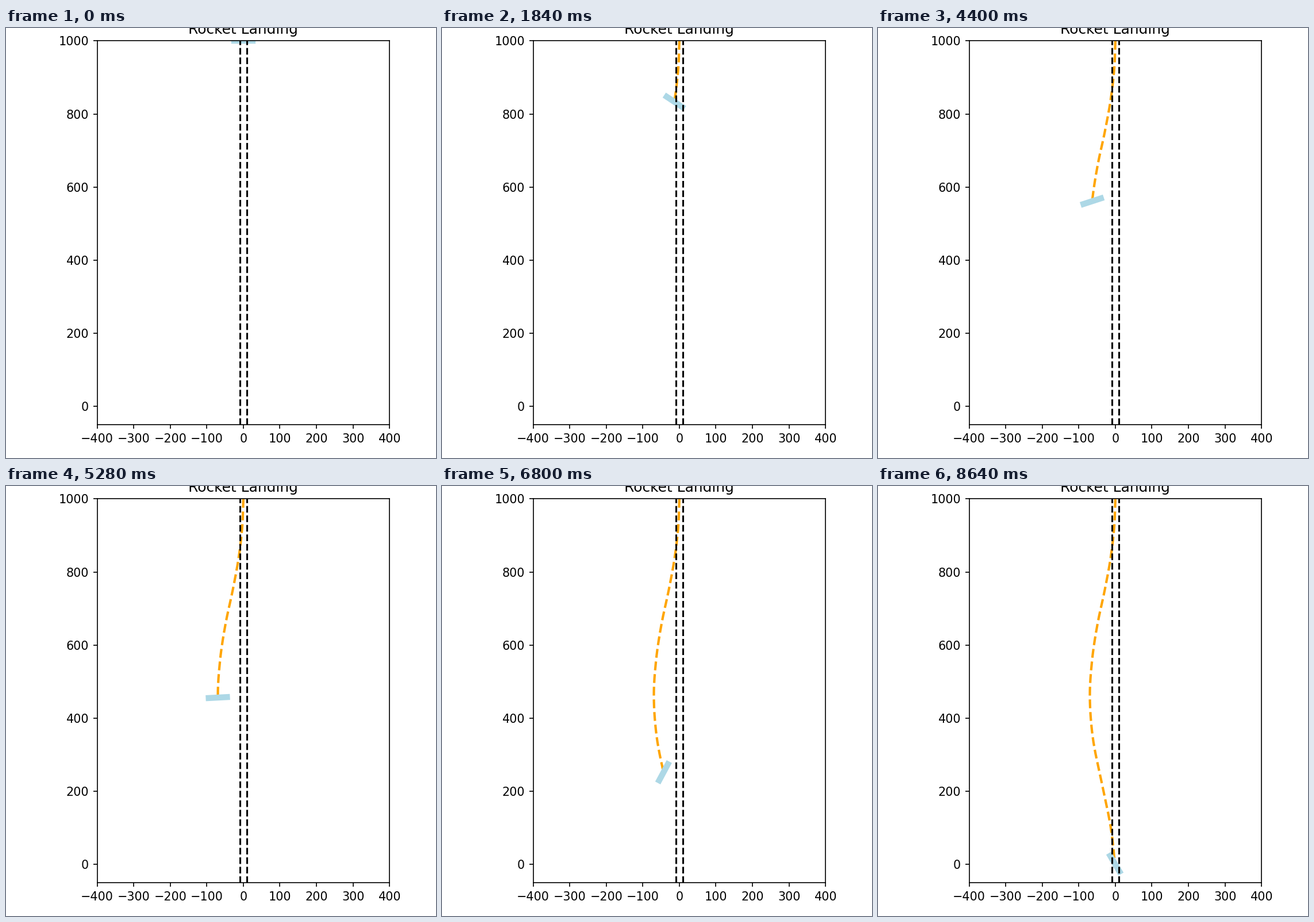
Recreate the animation shown at these times as a matplotlib script. Size 748 px wide and 748 px high, loop 8680 ms.

```python
import matplotlib.pyplot as plt
import numpy as np
from matplotlib.animation import FuncAnimation

SIZE = 748
FRAMES = 217
STEP = 40          # ms per frame
KNOT = 0.88        # seconds between flight knots
LENGTH = 50        # rocket length in metres

# Flight knots: position in metres and direction of the tail in degrees
KNOT_X = [0, -3, -12.5, -29, -48.8, -63.4, -69.8, -60.9, -36.2, -12.1, 0.8]
KNOT_Y = [1000, 925, 841.3, 750.6, 657.8, 561.4, 456.4, 341.1, 218.5, 97.8, -19.3]
KNOT_TAIL = [0, -8, -30.5, -72, -124, -162, -177, -158.5, -103, -61, -60]

# Engine bursts: start, end (s), direction (deg), flame length (m)
BURSTS = [
    (3.04, 3.20, 31, 22),
    (3.44, 3.52, 195, 22),
    (6.96, 7.08, -135, 48),
]


def spline(knots, t):
    """Cubic Hermite curve through evenly spaced knots."""
    p = np.asarray(knots, float)
    m = np.gradient(p)
    k = np.minimum((t / KNOT).astype(int), len(p) - 2)
    s = t / KNOT - k
    return ((1 + 2 * s) * (1 - s) ** 2 * p[k] + s * (1 - s) ** 2 * m[k]
            + s ** 2 * (3 - 2 * s) * p[k + 1] + s ** 2 * (s - 1) * m[k + 1])


def ray(angle, length):
    return length * np.cos(angle), length * np.sin(angle)


time = np.arange(FRAMES) * STEP / 1000
xs = spline(KNOT_X, time)
ys = spline(KNOT_Y, time)
tails = np.radians(spline(KNOT_TAIL, time))

plt.rcParams["font.family"] = "DejaVu Sans"
fig = plt.figure(figsize=(5, 5), dpi=SIZE / 5)
ax = fig.add_axes([158.6 / SIZE, 58 / SIZE, 508.6 / SIZE, 667.6 / SIZE])
ax.set_xlim(-400, 400)
ax.set_ylim(-50, 1000)
ax.set_xticks(range(-400, 401, 100))
ax.set_yticks(range(0, 1001, 200))
ax.set_title("Rocket Landing")

path, = ax.plot([], [], "--", lw=2, color="orange")
flame, = ax.plot([], [], lw=2, color="tomato")
body, = ax.plot([], [], lw=5, color="lightblue")
for x in (-10, 10):
    ax.axvline(x, ls="--", lw=1.5, color="black")


def update(i):
    x, y, t = xs[i], ys[i], time[i]
    dx, dy = ray(tails[i], LENGTH / 2)
    path.set_data(xs[:i + 1], ys[:i + 1])
    body.set_data([x - dx, x + dx], [y - dy, y + dy])
    flame.set_data([], [])
    for start, end, angle, length in BURSTS:
        if start - 1e-6 <= t <= end + 1e-6:
            fx, fy = ray(np.radians(angle), length)
            flame.set_data([x + dx, x + dx + fx], [y + dy, y + dy + fy])
    return path, flame, body


anim = FuncAnimation(fig, update, frames=FRAMES, interval=STEP,
                     repeat=True, repeat_delay=0)
plt.show()
```
